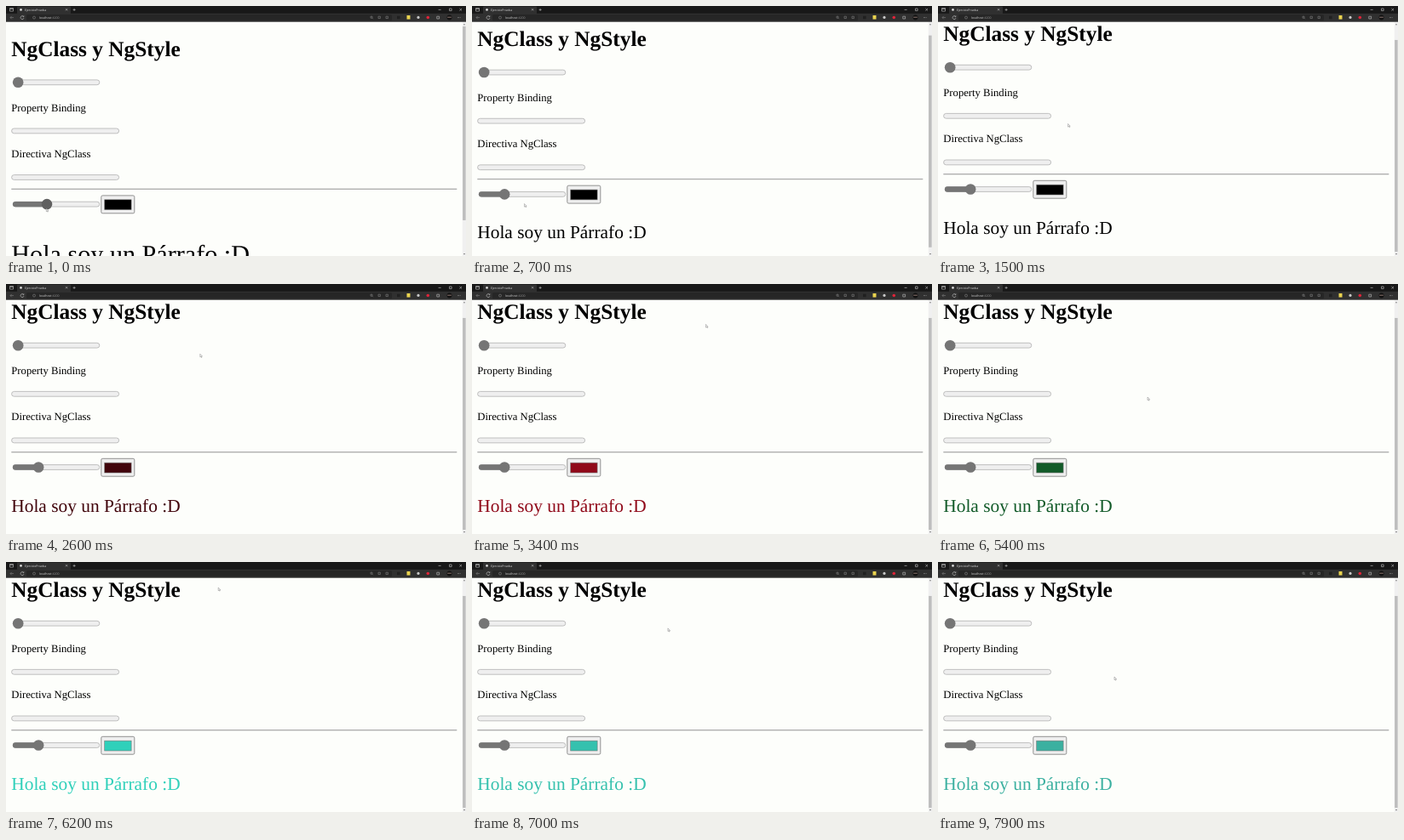
An HTML page that plays this animation: 540 by 294 pixels, repeating every 8000 ms.

```html
<!DOCTYPE html>
<html lang="es">
<head>
<meta charset="utf-8">
<title>NgClass y NgStyle</title>
<style>
  html, body { margin: 0; width: 100%; height: 100%; overflow: hidden; background: #fdfefb; }
  svg { display: block; width: 540px; height: 294px; }
  text { text-rendering: geometricPrecision; }
  .page text { font: 12.67px "Liberation Serif", "Times New Roman", serif; }
  .page .title { font-size: 25.33px; font-weight: bold; }
  .bar { fill: #efefef; stroke: #b2b2b2; stroke-width: .8; }
  .knob { fill: #757575; }
  .ui text { font: 3.5px "Open Sans", "Noto Sans", sans-serif; fill: #ddd; }
  .line { fill: none; stroke: #c4c4c4; stroke-width: .6; }
  .dim { fill: none; stroke: #858585; stroke-width: .6; }
</style>
</head>
<body>
<svg viewBox="0 0 540 294">
  <defs>
    <rect id="range" class="bar" x="8.2" y="-2.9" width="101.6" height="5.8" rx="2.9"/>
    <rect id="meter" class="bar" x="6.6" y="-2.9" width="126" height="5.8" rx="2.9"/>
  </defs>
  <rect width="540" height="294" fill="#fdfefb"/>
  <g class="page" id="page">
    <text class="title" x="6.3" y="58.7">NgClass y NgStyle</text>
    <use href="#range" y="89.8"/>
    <circle class="knob" cx="14.2" cy="89.8" r="6.3"/>
    <text x="6.3" y="123.6">Property Binding</text>
    <use href="#meter" y="146.9"/>
    <text x="6.3" y="178.1">Directiva NgClass</text>
    <use href="#meter" y="201.5"/>
    <rect x="6.3" y="214.6" width="523" height="1.4" fill="#b0b0b0"/>
    <use href="#range" y="233.1"/>
    <rect id="fill" x="7.9" y="229.9" height="6.4" rx="3.2" fill="#757575"/>
    <circle id="knob" class="knob" cy="233.1" r="6.3"/>
    <rect x="111.8" y="222.9" width="39" height="20.9" rx="1.6" fill="#efefef" stroke="#767676" stroke-width=".8"/>
    <rect id="swatch" x="115.7" y="227.8" width="31.4" height="11.8" stroke="#777" stroke-width=".6"/>
    <text id="para" x="6.3">Hola soy un Párrafo :D</text>
  </g>

  <rect x="535.8" y="18.5" width="4.2" height="275.5" fill="#f0f0f0"/>
  <path d="M536.8 22.2l1.2-1.5 1.2 1.5zM536.8 291l1.2 1.5 1.2-1.5z" fill="#777"/>
  <rect id="thumb" x="536.1" width="3.5" fill="#bdbdbd"/>

  <g class="ui">
    <rect width="540" height="9" fill="#181818"/>
    <rect y="8.8" width="540" height="9.9" fill="#303030"/>
    <rect x="13" y=".6" width="63" height="9" rx="1" fill="#303030"/>
    <rect x="24" y="9.9" width="429" height="7.4" rx="1.6" fill="#262626"/>
    <path class="line" d="M4.5 2.5h4v3.6h-4zM4.5 3.5h4"/>
    <circle cx="17.5" cy="4.4" r="1.3" fill="#ddd"/>
    <text x="22" y="5.6">EjercicioPrueba</text>
    <path class="line" d="M70 3.2l2.2 2.2m0-2.2l-2.2 2.2M78.6 4.4h3m-1.5-1.5v3"/>
    <path class="line" d="M507.6 4.4h3M520.5 3h2.6v2.6h-2.6zM532.4 3l2.6 2.6m0-2.6l-2.6 2.6"/>
    <path class="dim" d="M9 13.6H5m1.7-1.7L5 13.6l1.7 1.7"/>
    <path class="line" d="M20.7 12.5a2 2 0 1 0 .3 1.6m-.1-2.8v1.4h-1.4"/>
    <circle class="dim" cx="33" cy="13.6" r="1.5"/>
    <text x="38.8" y="14.9">localhost<tspan fill="#999">:4200</tspan></text>
    <path class="dim" d="M428 12.2h2v2h-2zm2 2l1 1M437 12.2h2.4v2.4h-2.4zM446 12.2h2.4v2.4h-2.4z"/>
    <rect x="459" y="11.7" width="3.6" height="3.6" fill="#202020"/>
    <rect x="470.5" y="11" width="4" height="4.6" fill="#ead34f"/>
    <circle cx="484" cy="13.4" r="1.6" fill="#c8c8c8"/>
    <circle cx="495.3" cy="13.5" r="1.8" fill="#df2439"/>
    <path class="line" d="M505.8 12.2h2.8v2.8h-2.8z"/>
    <circle cx="520.5" cy="13.5" r="2.9" fill="#111"/>
    <rect x="518.2" y="12.7" width="4.6" height="1" fill="#8d7770"/>
    <path class="line" d="M530 13.6h3.5" stroke-dasharray=".7 .7"/>
  </g>

  <path id="cursor" d="M0 0v3.600l.9-.7.600 1.300.600-.3-.600-1.200h1.100z" fill="#fff" stroke="#777" stroke-width=".45"/>
</svg>
<script>
const LOOP = 8000, STEP = 100;

// Resting points of the pointer: time, x, y.
const stops = [
  [500, 37.5, 238], [1100, 130, 217], [1500, 152.6, 138.5], [3400, 274.5, 47.5],
  [4400, 209.5, 126.5], [5400, 246, 133], [6200, 249.2, 30], [7900, 207, 135]
];
// Picked colours: time, hue, saturation, lightness.
const picks = [
  [1900, -7, 88, 0], [3400, -7, 88, 30], [4400, -6, 78, 16],
  [5400, 139, 68, 21], [6200, 172, 63, 50], [7900, 172, 50, 46]
];

const set = (id, attrs) => {
  const el = document.getElementById(id);
  for (const key in attrs) el.setAttribute(key, attrs[key]);
};
const ramp = (t, from, to) => Math.min(1, Math.max(0, (t - from) / (to - from)));
const smooth = k => k * k * (3 - 2 * k);

// Eases from one row to the next.
const at = (rows, t) => rows.reduce((now, row, i) => {
  const k = i ? smooth(ramp(t, rows[i - 1][0], row[0])) : 1;
  return now.map((v, n) => v + (row[n + 1] - v) * k);
}, rows[0].slice(1));

function draw(t) {
  const value = .378 - .11 * smooth(ramp(t, 0, 500));
  const top = 17.6 * ramp(t, 500, 800);
  const size = 79.8 * value;
  const x = 14.2 + 89.4 * value;
  const dragging = t < 600;
  const [mx, my] = t < 500 ? [x - .7, 238] : at(stops, t);
  const [h, s, l] = at(picks, t);
  const ink = `hsl(${h} ${s}% ${l}%)`;

  set("page", { transform: `translate(0 ${-top})` });
  set("knob", { cx: x, style: `fill:${dragging ? "#606060" : "#757575"}` });
  set("fill", { width: x - 7.9 });
  set("swatch", { fill: ink });
  set("para", { y: 244.7 + 1.89 * size, fill: ink, style: `font-size:${size}px` });

  // The scrollbar follows the page height, which grows with the paragraph.
  const height = 226.2 + 3.1 * size;
  set("thumb", { y: 24 + top * 265 / height, height: 265 * 275 / height });
  set("cursor", { transform: `translate(${mx} ${my})` });
}

const start = performance.now();
function tick() {
  const t = (performance.now() - start) % LOOP;
  draw(Math.floor(t / STEP) * STEP);
  requestAnimationFrame(tick);
}
tick();
</script>
</body>
</html>
```
